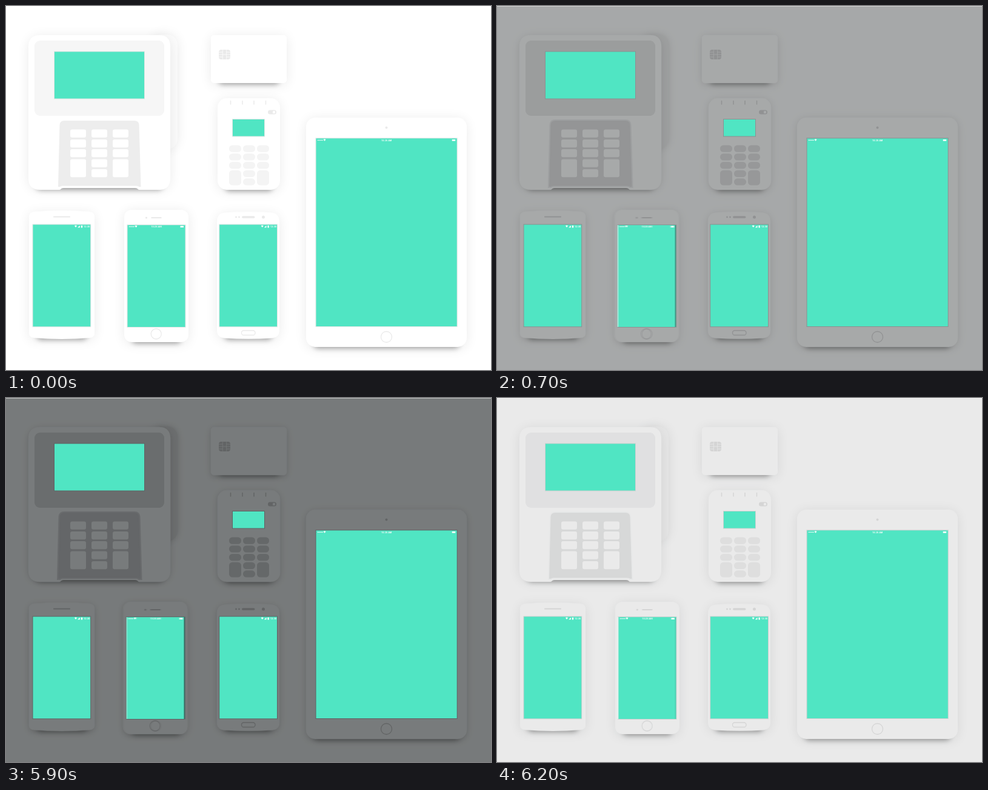
Write an HTML page that moves like this. It is 800 by 600 pixels and loops after 6300 ms.

```html
<!DOCTYPE html>
<html lang="en">
<head>
<meta charset="utf-8">
<title>Devices, light to dark</title>
<style>
html, body { margin: 0; width: 100%; height: 100%; overflow: hidden; background: #fff; }
svg { display: block; width: 800px; height: 600px; }
text { font: 500 4.1px Roboto, "Open Sans", sans-serif; fill: #fff; }
</style>
</head>
<body>
<svg id="stage" viewBox="0 0 800 600"></svg>
<script>
const GREEN = '#50e5c3';
const light = {
  bg: '#fff', top: 0, body: '#fff', edge: 0, panel: '#f6f6f6', pad: '#ededed', flap: '#fbfbfb',
  detail: '#eaeaea', keys: '#f4f4f4', frame: '#e2e5e4',
  glow: 0.08, blur: 'wide', drop: 0.36, grow: 0, shift: 0
};
const dark = {
  bg: '#404445', top: 0.5, body: '#414546', edge: 1, panel: '#313536', pad: '#2c2f31', flap: '#313435',
  detail: '#2a2d2f', keys: '#2b2e30', frame: '#2a2d2f',
  glow: 0.32, blur: 'near', drop: 0.3, grow: 4, shift: -2
};

// Shapes are given by their left, top, right and bottom edges
const box = (l, t, r, b, rx, fill, more = '') =>
  `<rect x="${l}" y="${t}" width="${r - l}" height="${b - t}" rx="${rx}" fill="${fill}" ${more}/>`;
const dot = (x, y, r, fill, more = '') =>
  `<circle cx="${x}" cy="${y}" r="${r}" fill="${fill}" ${more}/>`;
const path = (d, fill, more = '') => `<path d="${d}" fill="${fill}" ${more}/>`;
const line = (d, color, w) =>
  path(d, 'none', `stroke="${color}" stroke-width="${w}" stroke-linecap="round"`);

// Three columns of keys; the outer ones end in a tall key
function keypad(xs, w, ys, h, rx, fill) {
  return xs.map((x, col) => ys.map((y, row) => {
    if (col !== 1 && row === 4) return '';
    const bottom = col !== 1 && row === 3 ? ys[4] + h : y + h;
    return box(x, y, x + w, bottom, rx, fill);
  }).join('')).join('');
}

const wifi = (x, y) => path(`M${x - 2} ${y - 1}q2 -1.5 4 0l-2 2.8z`, '#fff');

function androidBar(x) {
  return wifi(x, 363.3) +
    path(`M${x + 3.2} 365.3h3.6v-3.6z`, '#fff') +
    box(x + 8.8, 361.7, x + 11.2, 365.4, 0.5, '#fff') +
    `<text x="${x + 13}" y="365.3">12:30</text>`;
}

function tabletBar(l, r, y) {
  let dots = '';
  for (let i = 0; i < 5; i++) dots += dot(l + 3 + i * 1.9, y, 0.8, '#fff');
  return dots + wifi(l + 14, y - 0.2) +
    `<text x="${(l + r) / 2}" y="${y + 1.5}" text-anchor="middle">10:28 AM</text>` +
    box(r - 8, y - 1.3, r - 2.5, y + 1.3, 0.5, '#fff');
}

function scene(c) {
  const shadow = (l, t, r, b, rx) =>
    box(l, t + 2, r, b + 3, rx, '#000', `opacity="${c.glow}" filter="url(#${c.blur})"`) +
    box(l + 12, b - 40, r - 12, b + 2, 8, '#000', `opacity="${c.drop}" filter="url(#near)"`);
  const edge = `stroke="${c.body}" stroke-width="${c.edge}"`;
  const slab = (l, t, r, b, rx) => shadow(l, t, r, b, rx) + box(l, t, r, b, rx, c.body, edge);
  const screen = (l, t, r, b) =>
    box(l, t, r, b, 0, GREEN, `stroke="${c.frame}" stroke-width="2" paint-order="stroke"`);
  const ring = `stroke="${c.detail}" stroke-width="1.3"`;

  const terminal =
    box(240, 47, 283, 236, 17, '#000', `opacity="${c.glow}" filter="url(#${c.blur})"`) +
    box(240, 47, 283, 236, 17, c.flap) +
    shadow(37, 48, 271, 301, 19) +
    path('M56 48H252Q271 48 271 67V284Q271 303 252 303H221C217 303 218 299.5 213 299.5' +
      'H95C90 299.5 91 303 87 303H56Q37 303 37 284V67Q37 48 56 48z', c.body, edge) +
    box(47, 57, 261, 181, 9, c.panel) +
    screen(80, 75.5, 228, 152.5) +
    path('M96 189H212Q219 189 219.5 196L222.5 298H219.5Q218.5 296.5 215 296.5' +
      'H93Q90 296.5 89 298H86L88.5 196Q89 189 96 189z', c.pad,
      `stroke="${c.pad}" stroke-width="${c.grow}"`) +
    // the lip below the keys
    path('M86 302.5C90 302.5 89 298.2 94 298.2H214C219 298.2 218 302.5 222 302.5' +
      'L221 303C217 303 218 300 213 300H95C90 300 91 303 87 303z', c.body) +
    keypad([106, 141, 176], 26, [203.5, 220, 236, 252.5, 269], 13.2, 3, c.body);

  const card = slab(338, 48, 463, 127, 5) +
    box(351, 72, 370, 88, 4, c.detail) +
    line('M351 76.2h6M351 80h6M351 84h6M364 76.2h6M364 80h6M364 84h6' +
      'M357.3 72.5v15M363.7 72.5v15M357.3 80h6.4', c.body, 0.7);

  const reader = slab(349, 152, 452, 303, 15) +
    [370.5, 390, 409, 428.5].map(x => line(`M${x} 156.5v5.5`, c.detail, 1.5)).join('') +
    box(432, 171.5, 446, 178.5, 3.5, c.detail) + dot(442, 175, 2.2, c.body) +
    screen(374, 187, 426, 214.5) +
    keypad([368, 391, 414], 20, [229.5, 243.2, 257, 270.7, 284.3], 11.3, 5.4, c.keys);

  const phoneA = shadow(38, 339, 146, 548, 9) +
    path('M38 347Q38 340 46 339Q92 335.5 138 339Q146 340 146 347V540' +
      'Q146 546 138 547Q92 551 46 547Q38 546 38 540z', c.body, edge) +
    box(78, 346.4, 106, 348.5, 1, c.detail) +
    screen(44.5, 360.5, 139.2, 528.3) + androidBar(115);

  const phoneB = `<g transform="translate(${c.shift})">` +
    slab(195, 336, 301, 554, 12) +
    dot(231.5, 349, 1.6, c.detail) + box(239.3, 348.1, 256.7, 350, 0.9, c.detail) +
    screen(200.5, 361.2, 295.5, 529) + tabletBar(200.5, 295.5, 363.7) +
    dot(247.7, 540.5, 8.5, 'none', ring) + '</g>';

  const phoneC = shadow(348, 341, 451, 548, 14) +
    path('M348 356C348 344 354 341 364 340.3Q400 338 435 340.3C446 341 451 345 451 356' +
      'V534C451 543 447 546.5 438 547.5Q400 550 361 547.5C352 546.5 348 543 348 534z', c.body, edge) +
    dot(379.5, 348, 1.4, c.detail) + dot(384.5, 348, 1.4, c.detail) +
    box(389, 346.2, 410.5, 349.8, 1.8, c.detail) + dot(424.5, 348, 2.5, c.detail) +
    screen(352.2, 360.5, 447, 528.3) + androidBar(422.7) +
    box(388.5, 535, 411, 542.5, 3.5, 'none', ring);

  const tablet = slab(495, 184, 760, 562, 15) +
    dot(627.5, 200.5, 2, c.detail) +
    screen(511.5, 218.3, 743.7, 528) + tabletBar(511.5, 743.7, 221.2) +
    dot(627.5, 545.5, 9, 'none', ring);

  return box(0, c.top, 800, 600, 0, c.bg) +
    terminal + card + reader + phoneA + phoneB + phoneC + tablet;
}

const blur = (id, size) =>
  `<filter id="${id}" x="-50%" y="-50%" width="200%" height="200%"><feGaussianBlur stdDeviation="${size}"/></filter>`;

document.getElementById('stage').innerHTML =
  `<defs>${blur('wide', 10)}${blur('near', 4)}</defs>` +
  `<g>${scene(light)}</g><g id="night">${scene(dark)}</g>`;
const night = document.getElementById('night');

// The fade moves in five held steps of 100 ms, down again near the end
function darkness(t) {
  let step = 0;
  if (t >= 5900) step = 4 - Math.floor((t - 5900) / 100);
  else if (t >= 500) step = Math.min(5, 1 + Math.floor((t - 500) / 100));
  const u = step / 5;
  return 0.41 * u + 0.59 * u * u;
}

const start = performance.now();
function draw() {
  night.setAttribute('opacity', darkness((performance.now() - start) % 6300));
  requestAnimationFrame(draw);
}
draw();
</script>
</body>
</html>
```
